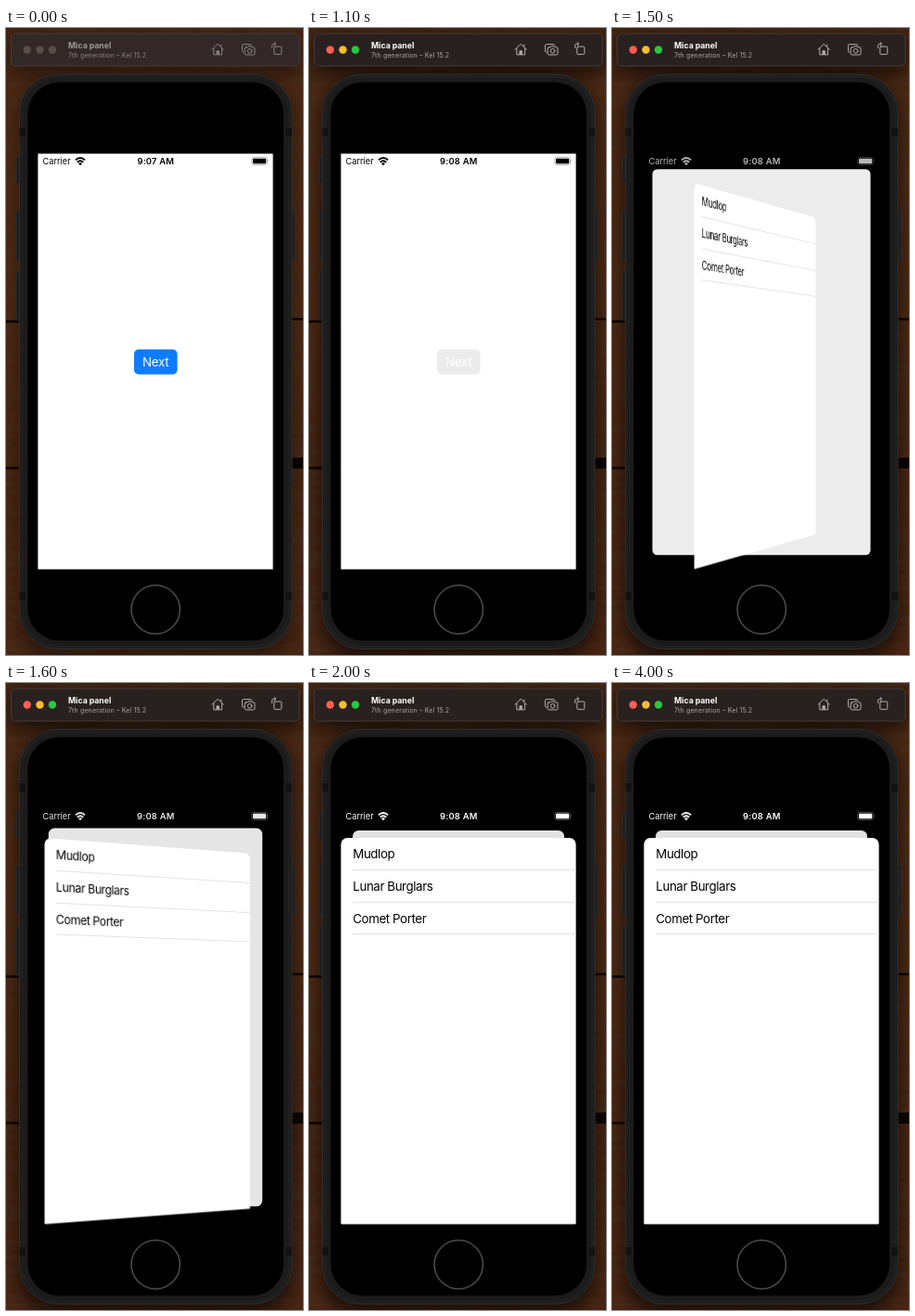
Write an HTML page that moves like this. It is 320 px wide and 676 px high and loops after 4.1 s.

```html
<!DOCTYPE html>
<html lang="en">
<head>
<meta charset="utf-8">
<title>Sheet flip</title>
<style>
  html, body { margin: 0; width: 100%; height: 100%; overflow: hidden; background: #32190c; }
  body { position: relative; font-family: Inter, Roboto, sans-serif; }
  svg { position: absolute; left: 0; top: 0; display: block; }
  .window { --bar: #312827; --edge: #453c3a; --icon: #8b8381; --title: #a09997; --sub: #8c8482; --shade: .4; }
  .window.active { --bar: #292120; --edge: #443b39; --icon: #b3adab; --title: #fff; --sub: #aaa4a2; --shade: .6; }
  .lights circle { fill: #574e4c; }
  .active .lights :nth-child(1) { fill: #ff5f57; }
  .active .lights :nth-child(2) { fill: #febc2e; }
  .active .lights :nth-child(3) { fill: #28c840; }
  .icons { fill: none; stroke: var(--icon); stroke-width: 1; stroke-linejoin: round; stroke-linecap: round; }
  .sheet {
    position: absolute; left: 34px; top: 167px; width: 254px; height: 417px;
    background: #fff; clip-path: inset(0 .4px .4px .4px round 7px 7px 1px 1px);
    transform-origin: 0 50%; visibility: hidden;
  }
  .row {
    margin-left: 13.3px; height: 33.8px; line-height: 35px; border-bottom: 1px solid #e2e2e3;
    font-size: 13.3px; letter-spacing: -.4px; color: #000; white-space: nowrap;
  }
</style>
</head>
<body>
<svg class="window" id="window" width="320" height="676" viewBox="0 0 320 676">
  <defs>
    <linearGradient id="wood" x2="0" y2="1">
      <stop offset="0" stop-color="#472511"/>
      <stop offset=".25" stop-color="#4f2913"/>
      <stop offset=".46" stop-color="#4e2812"/>
      <stop offset=".7" stop-color="#482411"/>
      <stop offset="1" stop-color="#4a2412"/>
    </linearGradient>
    <filter id="grain" x="0" y="0" width="100%" height="100%">
      <feTurbulence type="fractalNoise" baseFrequency=".03 .22" numOctaves="3" seed="7"/>
      <feColorMatrix values="0 0 0 0 .07  0 0 0 0 .025  0 0 0 0 .01  0 2.6 0 0 -.95"/>
    </filter>
    <filter id="soft" x="-20%" y="-20%" width="140%" height="140%"><feGaussianBlur stdDeviation="9"/></filter>
  </defs>

  <rect width="320" height="676" fill="url(#wood)"/>
  <rect width="320" height="676" filter="url(#grain)"/>
  <path d="M0 316.5H20M300 314H320M0 474.5H20" stroke="#0d0602" stroke-width="2.5"/>
  <path d="M300 464 320 463V475H300Z" fill="#0d0602"/>
  <g filter="url(#soft)" style="opacity: var(--shade)">
    <rect x="12" y="54" width="298" height="628" rx="44"/>
    <rect x="4" y="8" width="313" height="42" rx="6"/>
  </g>

  <rect x="5.5" y="6" width="310.5" height="35" rx="5" style="fill: var(--bar); stroke: var(--edge)"/>
  <g class="lights">
    <circle cx="22.8" cy="23.5" r="4.2"/><circle cx="36.5" cy="23.5" r="4.2"/><circle cx="50" cy="23.5" r="4.2"/>
  </g>
  <text x="67" y="22.3" font-size="8.7" font-weight="700" style="fill: var(--title)">Mica panel</text>
  <text x="67" y="31.8" font-size="7.1" letter-spacing=".1" style="fill: var(--sub)">7th generation – Kel 15.2</text>
  <g class="icons">
    <path d="M222 23.2 228.2 17.3 234.4 23.2M223.8 22V28.8H232.6V22M231.8 20V18"/>
    <path d="M227 28.5V24.8H229.4V28.5" style="fill: var(--icon)"/>
    <path d="M256.2 26H255.6Q254.5 26 254.5 24.8V18.8Q254.5 17.6 255.6 17.6H263.6Q264.8 17.6 264.8 19"/>
    <path d="M258.6 20.8H260L260.8 19.8H264.2L265 20.8H266.6Q268 20.8 268 22V27.6Q268 28.9 266.6 28.9H258.6Q257.2 28.9 257.2 27.6V22Q257.2 20.8 258.6 20.8Z"/>
    <circle cx="262.6" cy="24.7" r="2.3"/>
    <rect x="288.8" y="20" width="8" height="8.4" rx="1"/>
    <path d="M286.6 21.5V19Q286.6 17 289 17H290.6M289.2 15.4 290.8 17 289.2 18.6"/>
  </g>

  <g fill="#1c1c1d" stroke="#303031" stroke-width=".7">
    <rect x="11.3" y="138.5" width="5" height="29" rx="1.3"/>
    <rect x="11" y="196.5" width="5" height="53" rx="1.3"/>
    <rect x="11" y="263" width="5" height="52" rx="1.3"/>
    <rect x="306" y="197" width="5" height="53" rx="1.3"/>
  </g>
  <rect x="14.5" y="50" width="293.5" height="619.5" rx="42" fill="#1b1b1c" stroke="#303031"/>
  <rect x="17.5" y="52.5" width="287.5" height="614.5" rx="39" fill="none" stroke="#202021" stroke-width="2"/>
  <path d="M14.5 108H21V117H14.5ZM301.5 108H308V117H301.5ZM14.5 608H21V617H14.5ZM301.5 608H308V617H301.5Z" fill="#121213"/>
  <rect x="23.5" y="58.5" width="275.5" height="602" rx="34" fill="#000"/>
  <circle cx="161.2" cy="627" r="26.2" fill="#000" stroke="#4b4b4b" stroke-width="1.6"/>

  <g id="page">
    <rect id="paper" x="34.4" y="135.5" width="253.2" height="448.1"/>
    <g id="button">
      <rect id="pill" x="138" y="346.5" width="46.6" height="27" rx="5"/>
      <text id="label" x="161.2" y="364.6" text-anchor="middle" font-size="13.3" letter-spacing="-.2" fill="#fff">Next</text>
    </g>
  </g>

  <g id="status">
    <text x="39.6" y="147" font-size="9.2">Carrier</text>
    <text id="clock" x="161.3" y="147" text-anchor="middle" font-size="9.4" font-weight="600" letter-spacing=".2"></text>
    <g fill="none" stroke="currentColor" stroke-width="1.9">
      <path d="M74.9 142.4Q80 137.7 85.1 142.4M76.8 144.7Q80 141.6 83.2 144.7"/>
    </g>
    <path d="M78 146 80 148.2 82 146Q80 144.3 78 146Z"/>
    <rect x="264.8" y="139.6" width="16.6" height="7.8" rx="2.2" fill="none" stroke="currentColor" stroke-opacity=".4" stroke-width=".8"/>
    <rect x="266" y="140.8" width="14.2" height="5.4" rx="1.2"/>
    <path d="M282.3 142.2Q283.6 143.5 282.3 144.8Z" fill-opacity=".45"/>
  </g>
</svg>

<div class="sheet" id="sheet">
  <div class="row">Mudlop</div>
  <div class="row">Lunar Burglars</div>
  <div class="row">Comet Porter</div>
</div>

<script>
  const LOOP = 4100, STEP = 100, FLIP_START = 1100;
  const flipProgress = [0, .06, .2, .45, .717, .9, .98, 1];
  const $ = id => document.getElementById(id);
  const gray = v => `rgb(${v}, ${v}, ${v})`;

  function drawButton(t) {
    $('pill').setAttribute('fill', t < 1000 ? '#0f7bff' : t < 1100 ? '#a9cdf6' : '#ebebec');
    $('label').setAttribute('opacity', t < 1200 ? 1 : t < 1300 ? .4 : 0);
  }

  function drawPage(p) {
    const scale = 1 - .1 * p;
    const dim = .115 * Math.max(0, (p - .2) / .8);
    $('page').setAttribute('transform',
      `translate(161.2 ${359.7 + p}) scale(${scale}) translate(-161.2 -359.7)`);
    $('paper').setAttribute('fill', gray(Math.round(255 * (1 - dim))));
    $('paper').setAttribute('rx', Math.min(7, 8 * p));
    const ink = gray(Math.round(255 * p));
    $('status').style.fill = $('status').style.color = ink;
  }

  // The sheet half-turns about its left edge, sliding left as it opens.
  function drawSheet(p) {
    const angle = Math.PI * (1 - p);
    const shift = 147 * (1 - Math.cos(angle));
    const sheet = $('sheet');
    sheet.style.visibility = p > .5 ? 'visible' : 'hidden';
    sheet.style.transform = p === 1 ? 'none'
      : `translateX(${shift}px) perspective(897px) rotateY(${angle}rad)`;
  }

  function draw(t) {
    const index = Math.max(0, Math.min(flipProgress.length - 1, (t - FLIP_START) / STEP));
    const p = flipProgress[index];
    $('window').classList.toggle('active', t >= 900);
    $('clock').textContent = t < 500 ? '9:07 AM' : '9:08 AM';
    drawButton(t);
    drawPage(p);
    drawSheet(p);
  }

  const start = performance.now();
  function tick() {
    const t = (performance.now() - start) % LOOP;
    draw(Math.floor(t / STEP) * STEP);
    requestAnimationFrame(tick);
  }
  tick();
</script>
</body>
</html>
```
